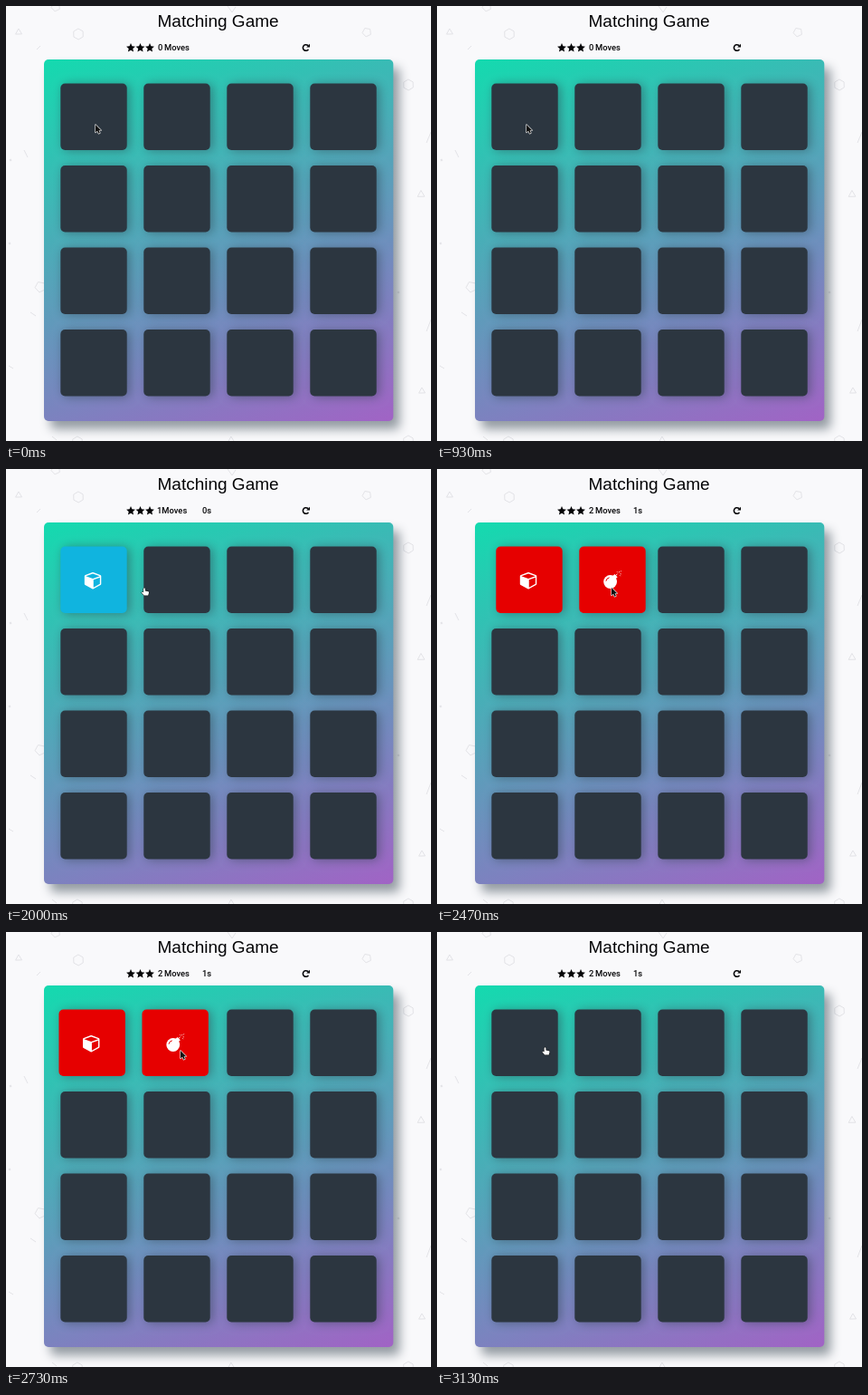
Recreate the animation shown at these times as an HTML page with a canvas. Size 470x480 px, loop 3190 ms.

```html
<!DOCTYPE html>
<html lang="en">
<head>
<meta charset="utf-8">
<title>Matching Game</title>
<style>
  html, body { margin: 0; width: 100%; height: 100%; overflow: hidden; background: #f9f9fb; }
  canvas { display: block; }
</style>
</head>
<body>
<canvas id="stage" width="470" height="480"></canvas>
<script>
const ctx = document.getElementById('stage').getContext('2d');
const LOOP = 3190, SIZE = 73.4;
const FIRST_CLICK = 1395, SECOND_CLICK = 2260, TICK = 2440, WRONG = 2405, CLOSE = 2900;

// Pointer stops: time, x, y
const STOPS = [[0, 99, 131], [1600, 99, 131], [2000, 153, 131], [2240, 193, 131],
               [2900, 193, 131], [3125, 119.5, 127], [LOOP, 119.5, 127]];

const ARROW = new Path2D('M0 0V8.6L2 6.8L3.4 9.8L4.9 9.1L3.6 6.2H6.2Z');
const HAND = new Path2D('M-.9 .9Q0-.6 .9 .9V3.4L4.4 4.2Q5.3 4.5 5 5.6L4.2 8.6H-.4L-3 5.6Q-2.9 4.2-.9 5.2Z');
const CUBE = new Path2D('M896 1629l640-349v-636l-640 233zM832 764l698-254-698-254-698 254z' +
  'M1664 512v768q0 75-67 112l-704 384q-61 32-122 0l-704-384q-67-37-67-112v-768q0-88 84-120' +
  'l704-256q44-16 88 0l704 256q84 32 84 120z');

function polygon(x, y, r, n, turn = 0, inner = r) {
  ctx.beginPath();
  const count = inner === r ? n : n * 2;
  for (let i = 0; i < count; i++) {
    const a = turn + i * 2 * Math.PI / count, d = i % 2 ? inner : r;
    ctx.lineTo(x + d * Math.cos(a), y + d * Math.sin(a));
  }
  ctx.closePath();
}

function line(...points) {
  ctx.beginPath();
  for (let i = 0; i < points.length; i += 2) ctx.lineTo(points[i], points[i + 1]);
  ctx.stroke();
}

function shadow(x, y, blur, color) {
  ctx.shadowOffsetX = x;
  ctx.shadowOffsetY = y;
  ctx.shadowBlur = blur;
  ctx.shadowColor = color;
}

function box(x, y, w, h, fill) {
  ctx.fillStyle = fill;
  ctx.beginPath();
  ctx.roundRect(x, y, w, h, 5);
  ctx.fill();
}

function drawBackground() {
  ctx.fillStyle = '#f9f9fb';
  ctx.fillRect(0, 0, 470, 480);
  ctx.strokeStyle = '#e3e3e7';
  ctx.lineWidth = 1;
  const shapes = [[80, 31, 6, 6], [445, 87, 6, 6], [445, 480, 6, 6], [79, 481, 6, 6], [38, 310, 6, 5],
                  [14, 29, 4, 3], [459, 208, 4.5, 3], [399, 29, 5, 5], [55, 1, 5, 5], [249, 480, 5, 3],
                  [5, 170, 1, 4], [4, 262, 1, 4], [434, 316, 1, 4], [460, 425, 4, 3]];
  for (const [x, y, r, n] of shapes) {
    polygon(x, y, r, n, 0.5);
    ctx.stroke();
  }
  line(20, 159, 24, 167);
  line(465, 151, 470, 139);
  line(465, 359, 470, 346);
  line(245, 0, 250, 7, 254, 1);
  line(34, 48, 38, 44);
  line(27, 338, 33, 342);
  line(3, 397, 8, 400);
  line(51, 475, 56, 479);
}

function drawHeader(moves, seconds) {
  ctx.fillStyle = '#050507';
  ctx.font = '19px "Liberation Sans", Arial, sans-serif';
  ctx.fillText('Matching Game', 167.5, 22.5);
  for (const x of [138, 148.5, 159]) {
    polygon(x, 46.3, 5.2, 5, -Math.PI / 2, 2.4);
    ctx.fill();
  }
  ctx.font = '500 9.4px Roboto, sans-serif';
  ctx.fillText(moves, moves === 1 ? 167 : 168, 49.3);
  ctx.fillText('Moves', moves === 1 ? 172.3 : 175, 49.3);
  if (seconds >= 0) {
    ctx.textAlign = 'center';
    ctx.fillText(seconds + 's', 222, 49.3);
    ctx.textAlign = 'left';
  }
  ctx.strokeStyle = '#050507';
  ctx.lineWidth = 1.6;
  ctx.beginPath();
  ctx.arc(331.7, 46, 3.3, 0.6, 5.5);
  ctx.stroke();
  ctx.beginPath();
  ctx.moveTo(336, 41.8);
  ctx.lineTo(336, 45.6);
  ctx.lineTo(332.2, 45.6);
  ctx.fill();
}

function drawCube(x, y) {
  ctx.save();
  ctx.translate(x - 10.2, y - 9.6);
  ctx.scale(0.0111, 0.0111);
  ctx.fill(CUBE, 'evenodd');
  ctx.restore();
}

function drawBomb(x, y, back) {
  ctx.beginPath();
  ctx.arc(x - 2.4, y + 2.3, 7.4, 0, 7);
  ctx.fill();
  ctx.save();
  ctx.translate(x + 2.6, y - 3.2);
  ctx.rotate(Math.PI / 4);
  ctx.fillRect(-2.3, -2, 4.6, 4);
  ctx.restore();
  ctx.lineWidth = 1;
  ctx.strokeStyle = back;
  ctx.beginPath();
  ctx.arc(x - 2.4, y + 2.3, 4.8, 3.3, 4.5);
  ctx.stroke();
  ctx.strokeStyle = '#fff';
  line(x + 3, y - 4, x + 5.5, y - 6.5);
  ctx.lineWidth = 0.7;
  line(x + 5, y - 9, x + 6, y - 7.8);
  line(x + 7.5, y - 9.3, x + 7.5, y - 8);
  line(x + 8.8, y - 8.8, x + 10, y - 9.8);
  line(x + 8.5, y - 6.5, x + 9.8, y - 6.3);
  line(x + 8, y - 5, x + 8.8, y - 4);
}

function drawBoard(t, open) {
  const grad = ctx.createLinearGradient(148.3, 20.3, 321.7, 496.7);
  grad.addColorStop(0, '#14daaf');
  grad.addColorStop(1, '#a163c5');
  shadow(7, 9, 12, 'rgba(46,61,73,.5)');
  box(42, 59, 386.3, 399, grad);

  const wrong = t >= WRONG && t < CLOSE, age = t - 2470;
  const shake = wrong ? 5 * 2 ** (-age / 400) * Math.cos(2 * Math.PI * age / 400) : 0;
  const face = wrong ? '#e60000' : '#10b4df';
  for (let i = 0; i < 16; i++) {
    const x = 60.3 + i % 4 * 92 + (open[i] ? shake : 0);
    const y = 85.5 + Math.floor(i / 4) * 90.5;
    shadow(3, 1, 12, 'rgba(46,61,73,.5)');
    box(x, y, SIZE, SIZE, open[i] ? face : '#2c3640');
    shadow(0, 0, 0, 'transparent');
    if (!open[i]) continue;
    ctx.fillStyle = '#fff';
    const cx = x + SIZE / 2, cy = y + SIZE / 2;
    if (i === 0) drawCube(cx, cy);
    else drawBomb(cx, cy, face);
  }
}

function pointerAt(t) {
  const i = STOPS.findIndex(s => s[0] > t);
  const [t0, x0, y0] = STOPS[i - 1], [t1, x1, y1] = STOPS[i];
  const p = (t - t0) / (t1 - t0), e = p * p * (3 - 2 * p);
  return [x0 + (x1 - x0) * e, y0 + (y1 - y0) * e];
}

function drawPointer(t, open) {
  const [x, y] = pointerAt(t);
  const col = Math.floor((x - 60.3) / 92);
  const onCard = x - 60.3 - col * 92 < SIZE;
  const hand = t > FIRST_CLICK && onCard && !open[col];
  const shape = hand ? HAND : ARROW;
  ctx.save();
  ctx.translate(x, y);
  ctx.lineJoin = 'round';
  ctx.lineWidth = hand ? 1 : 1.3;
  ctx.strokeStyle = hand ? '#111' : '#e8e8e8';
  ctx.stroke(shape);
  ctx.fillStyle = hand ? '#fff' : '#111';
  ctx.fill(shape);
  ctx.restore();
}

function draw(t) {
  const open = [t >= FIRST_CLICK && t < CLOSE, t >= SECOND_CLICK && t < CLOSE];
  drawBackground();
  drawHeader((t >= FIRST_CLICK) + (t >= SECOND_CLICK), t < FIRST_CLICK ? -1 : +(t >= TICK));
  drawBoard(t, open);
  drawPointer(t, open);
}

const start = performance.now();
function frame() {
  draw((performance.now() - start) % LOOP);
  requestAnimationFrame(frame);
}
frame();
</script>
</body>
</html>
```
